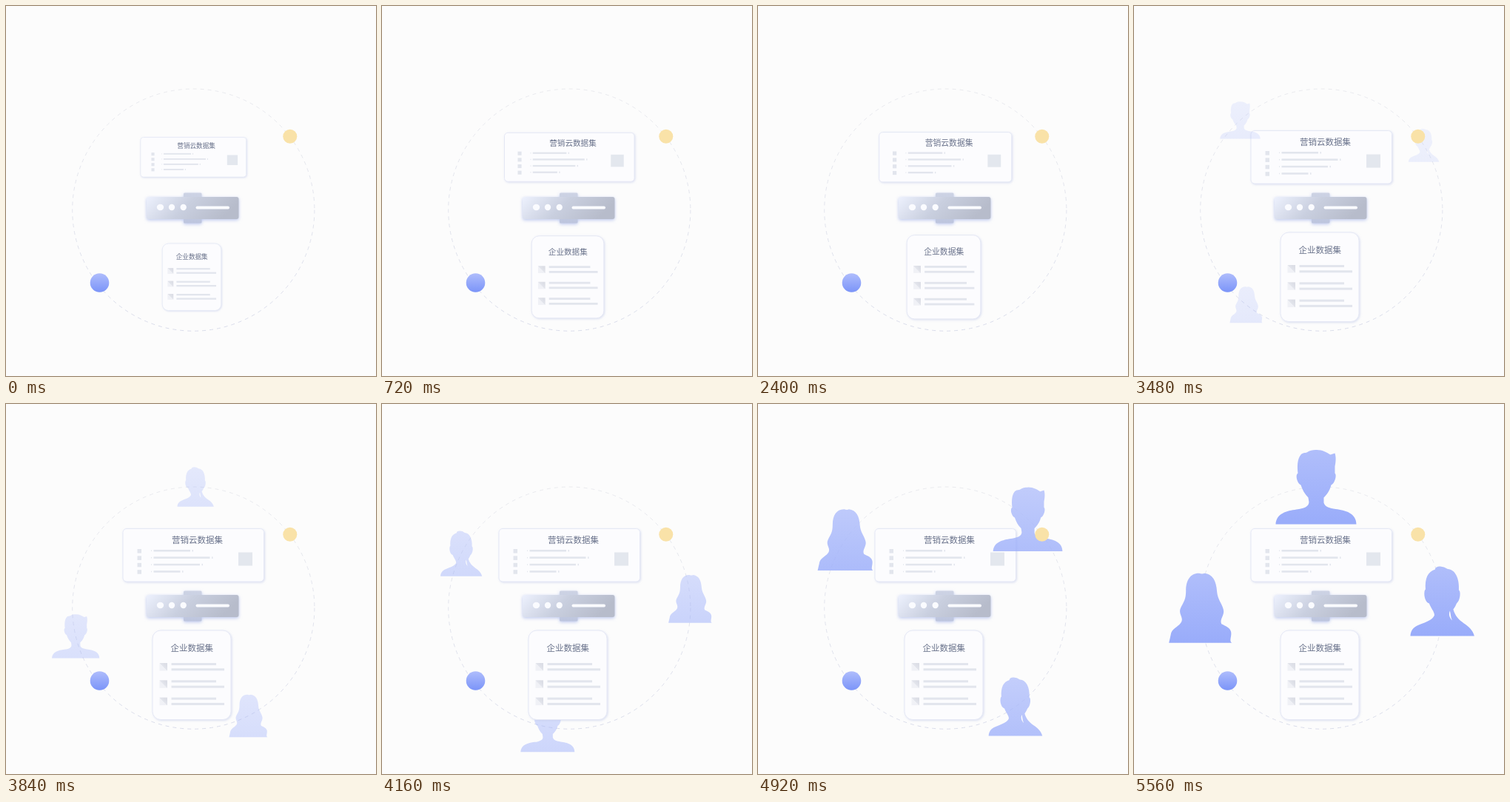
An HTML page that plays this animation: 500x500 px, repeating every 6000 ms.

```html
<!DOCTYPE html>
<html lang="zh">
<head>
<meta charset="utf-8">
<style>
  html, body { margin: 0; width: 100%; height: 100%; overflow: hidden; background: #fcfcfc; }
  svg { display: block; width: 100vw; height: 100vh; }
  text { font: 11.5px "Noto Sans CJK SC", "Noto Sans CJK", "Noto Sans", sans-serif; fill: #68718a; text-anchor: middle; }
  .card { fill: #fcfcfe; stroke: #e5e8f5; }
  .line { fill: #e2e5ed; }
  .person { fill: url(#skin); }
</style>
</head>
<body>
<svg viewBox="0 0 500 500">
  <defs>
    <linearGradient id="skin" x2="0" y2="1">
      <stop stop-color="#b0befb"/><stop offset="1" stop-color="#99acfa"/>
    </linearGradient>
    <linearGradient id="ball" x2="0" y2="1">
      <stop stop-color="#afbdfc"/><stop offset="1" stop-color="#7b94f8"/>
    </linearGradient>
    <linearGradient id="metal" x2="1" y2=".25">
      <stop stop-color="#edf1fd"/><stop offset=".5" stop-color="#c9cfdf"/><stop offset="1" stop-color="#b7bccb"/>
    </linearGradient>
    <linearGradient id="tab" x2="0" y2="1">
      <stop stop-color="#cdd3e4"/><stop offset="1" stop-color="#bdc5de"/>
    </linearGradient>
    <linearGradient id="fade" x2="0" y2="1">
      <stop stop-color="#e9eaee"/><stop offset="1" stop-color="#d9dcea"/>
    </linearGradient>
    <linearGradient id="chip" x1="1" y1="0" x2="0" y2="1">
      <stop offset=".2" stop-color="#dcdee6"/><stop offset=".5" stop-color="#e3e5ec"/><stop offset=".52" stop-color="#f0f1f6"/>
    </linearGradient>
    <filter id="soft" x="-20%" y="-20%" width="140%" height="140%">
      <feDropShadow dx="1" dy="1" stdDeviation="1.5" flood-color="#c3cbe8" flood-opacity=".6"/>
    </filter>
    <filter id="glow" x="-20%" y="-30%" width="140%" height="170%">
      <feDropShadow dx="0" dy="1.5" stdDeviation="2" flood-color="#a9b8ea" flood-opacity=".75"/>
    </filter>
  </defs>

  <circle cx="253.3" cy="275.6" r="163.6" fill="none" stroke="url(#fade)" stroke-dasharray="5 5"/>

  <g id="wide">
    <rect class="card" x="158" y="168.5" width="190.5" height="71.5" rx="5" filter="url(#soft)"/>
    <text x="258.4" y="187.7">营销云数据集</text>
    <rect x="314" y="200.5" width="19" height="18" fill="#e3e7ee"/>
  </g>

  <g id="people">
    <path class="person" d="M245 61.5C254 61 260 65 265 68L271 66C273 72 272 79 271 84L271 93C274 95 271 107 266 109C264 117 260 122 256 126L256 133C258 139 264 140 272 141.500C285 143 300 147 300 162L191 162C192 147 206 144 219 142C229 141 236 138 236 132L235 126C230 121 227 115 225 109C220 107 217 95 221 93C220 84 220 74 225 68C228 65 230 66 233 65C237 62 241 61.500 245 61.500Z"/>
    <path class="person" d="M88 228.500C76 228 70 238 70 252C70 264 67 267 63 275C59 283 67 288 64 294C61 300 53 302 50 309C49 314 48 318 47 322.500L132 322.500C128 320 132 314 131 308C130 302 124 300 118 297C115 290 123 285 120.500 277C118 268 113 264 112 254C111 238 106 230 95 228.500Q92 230 88 228.500Z"/>
    <path class="person" fill-rule="evenodd" d="M414 219C409 219 407 221 407 223C397 226 393 235 394 250C391 252 392 267 399 269C401 275 406 280 406 285C404 291 395 294 385 298C377 301 374 306 373.500 313L460 313C458 305 452 300 446 296C439 291 434 286 431.500 277C434 274 435 271 436 269C441 265 442 252 439 251C440 235 434 223 424 222.500Q419 219 414 219ZM427 279C425 283 426 288 430 292C428 288 428 283 427 279Z"/>
  </g>

  <g id="tall">
    <rect class="card" x="198" y="306" width="106" height="120.5" rx="11" filter="url(#soft)"/>
    <text x="251.3" y="333.9">企业数据集</text>
  </g>

  <g filter="url(#glow)">
    <rect x="240" y="252.500" width="24.500" height="41" rx="1.500" fill="url(#tab)"/>
    <rect x="190" y="258" width="124.500" height="30" rx="3" fill="url(#metal)"/>
  </g>
  <g fill="#fafbff">
    <ellipse cx="208.500" cy="272" rx="4.700" ry="4.200"/>
    <circle cx="224" cy="272" r="4.200"/>
    <circle cx="239.700" cy="272" r="4.200"/>
    <rect x="256.500" y="270.500" width="45.500" height="4" rx="2"/>
  </g>

  <circle cx="126.500" cy="374" r="12.800" fill="url(#ball)"/>
  <circle cx="383.800" cy="176.300" r="9.500" fill="#f9e2a8"/>
</svg>
<script>
const LOOP = 6000, STEP = 40;
const ring = { x: 253.3, y: 275.6, r: 163.6 };
const $ = id => document.getElementById(id);

function box(parent, x, y, width, height, extra) {
  const el = document.createElementNS('http://www.w3.org/2000/svg', 'rect');
  const attrs = { x, y, width, height, class: 'line', ...extra };
  for (const k in attrs) el.setAttribute(k, attrs[k]);
  parent.append(el);
}

[249, 275.5, 262, 235.5].forEach((end, i) => {
  const y = 197 + i * 9.4;
  box($('wide'), 177.5, y - 1, 5.5, 5.5);
  box($('wide'), 196, y + .5, 1, 1.5);
  box($('wide'), 199.5, y, end - 199.5, 2.5);
  box($('wide'), end + 2.5, y, 1.5, 2.5);
});

for (let i = 0; i < 3; i++) {
  const y = 350 + i * 23.3;
  box($('tall'), 207.5, y, 10.5, 10.5, { class: '', fill: 'url(#chip)' });
  box($('tall'), 223.5, y, 60.5, 3);
  box($('tall'), 223.5, y + 7.3, 71.5, 3);
}

// Card scale over time, linear between keys
const scaleKeys = [[0, .75], [700, .925], [1640, .75], [2640, 1]];
const cards = [
  { el: $('wide'), x: 253.3, y: 204.3 },
  { el: $('tall'), x: 251, y: 366.3 }
];

// Resting centre, final angle in degrees, and start time
const homes = [[245.7, 111.7, -92.5, 2960], [89.5, 275.4, 180, 2880], [416.7, 266, -3.2, 3040]];
const TRAVEL = 2520;
const people = [...$('people').children].map((el, i) => {
  const [x, y, angle, start] = homes[i];
  return { el, x, y, angle, start };
});

function lerpKeys(keys, t) {
  for (let i = 1; i < keys.length; i++) {
    const [t0, a] = keys[i - 1], [t1, b] = keys[i];
    if (t < t1) return a + (b - a) * (t - t0) / (t1 - t0);
  }
  return keys[keys.length - 1][1];
}

function place(el, cx, cy, x, y, s) {
  el.setAttribute('transform', `translate(${cx} ${cy}) scale(${s}) translate(${-x} ${-y})`);
}

function draw(t) {
  const s = lerpKeys(scaleKeys, t);
  for (const c of cards) place(c.el, c.x, c.y, c.x, c.y, s);

  for (const p of people) {
    const u = Math.min(1, Math.max(0, (t - p.start) / TRAVEL));
    const eased = u * u * (3 - 2 * u);
    const a = (p.angle + 360 * (1 - eased)) * Math.PI / 180;
    place(p.el, ring.x + ring.r * Math.cos(a), ring.y + ring.r * Math.sin(a), p.x, p.y, .37 + .63 * u);
    p.el.setAttribute('opacity', u);
  }
}

const begin = performance.now();
function tick(now) {
  const t = Math.max(0, now - begin) % LOOP;
  draw(t - t % STEP);
  requestAnimationFrame(tick);
}
draw(0);
requestAnimationFrame(tick);
</script>
</body>
</html>
```
